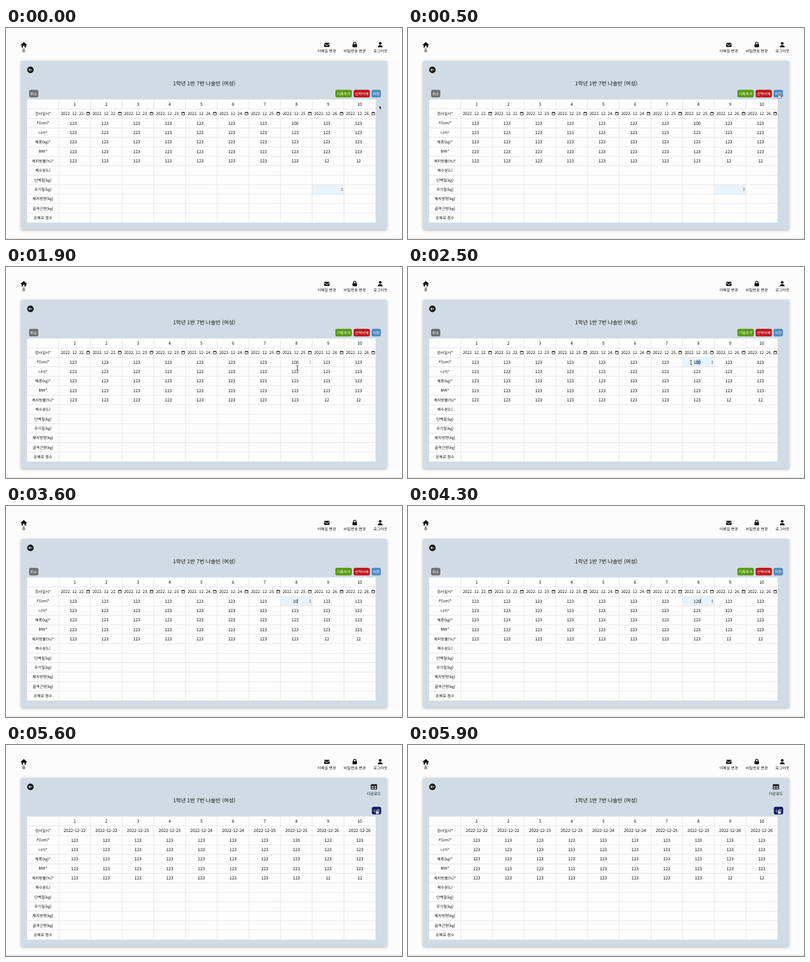
Animation of 600 by 320 pixels, one loop 6 s. Source, as an HTML page:

```html
<!DOCTYPE html>
<html lang="ko">
<head>
<meta charset="utf-8">
<title>측정 기록</title>
<style>
html, body { margin: 0; width: 100%; height: 100%; overflow: hidden; background: #fcfcfc; }
svg { display: block; width: 600px; height: 320px; }
text {
  font: 500 5.75px "Noto Sans CJK KR", "Noto Sans CJK", "Noto Sans KR", sans-serif;
  text-anchor: middle; text-rendering: geometricPrecision; fill: #111;
}
text.title { font-size: 8.05px; }
text.num { font-size: 6.5px; }
text.date { font-size: 6.25px; text-anchor: start; }
text.btn { fill: #fff; }
.panel { fill: #d0dbe5; filter: drop-shadow(0 1.5px 2px rgba(0, 0, 0, .3)); }
.grid { stroke: #e3e3e3; stroke-width: .8; fill: none; }
.focus { fill: #e8f3fe; }
.line { fill: none; stroke: #fff; stroke-width: .9; }
</style>
</head>
<body>
<svg viewBox="0 0 600 320" xmlns="http://www.w3.org/2000/svg">
  <rect width="600" height="320" fill="#fcfcfc"/>
  <rect y="318.6" width="600" height="1" fill="#dcdcdc"/>
  <rect class="panel" x="23" y="50" width="554" height="255.5" rx="1"/>

  <g fill="#111">
    <path d="M27 21.2L31.8 25.4L31 26.2L30.4 25.7V29.4H28V26.8H26V29.4H23.6V25.7L23 26.2L22.2 25.4Z"/>
    <rect x="482" y="22.4" width="8.2" height="6.3" rx=".9"/>
    <path class="line" d="M482 23.8L486.1 26.7L490.2 23.8" stroke-width=".7"/>
    <rect x="525" y="24.6" width="6.8" height="4.6" rx=".8"/>
    <path d="M526.4 25V23.6A2 2 0 0 1 530.4 23.6V25" fill="none" stroke="#111" stroke-width="1.1"/>
    <circle cx="567" cy="23.3" r="2.1"/>
    <path d="M563.4 29.3V28.6Q563.6 26 567 26T570.6 28.6V29.3Z"/>
    <circle cx="37" cy="63.5" r="4.9"/>
    <path class="line" d="M39.8 63.5H34.6M36.8 61.1L34.4 63.5L36.8 65.9"/>
  </g>
  <text x="27" y="35.6">홈</text>
  <text x="486" y="37.1">이메일 변경</text>
  <text x="528.5" y="37.1">비밀번호 변경</text>
  <text x="567.3" y="37.1">로그아웃</text>
  <text class="title" x="300.3" y="87.2">1학년 1반 7번 나솔빈 (여성)</text>

  <rect x="32" y="108.4" width="528" height="186.7" fill="#fdfdfd"/>
  <g id="focus"></g>
  <path id="grid" class="grid"/>
  <rect id="pick" y="140.4" height="7.6" fill="#a9c9ef"/>
  <g id="labels"></g>
  <g id="values"></g>
  <rect id="caret" y="140.6" width=".6" height="7" fill="#111"/>
  <path id="spin" d="M-1.2 -.9L0 -2.4L1.2 -.9ZM-1.2 .9L0 2.4L1.2 .9Z" fill="#444"/>

  <g id="edit"></g>
  <g id="read">
    <rect x="552.8" y="59.6" width="9.4" height="8" rx="1" fill="#111"/>
    <path d="M554 62.2H557V63.7H554ZM558 62.2H561V63.7H558ZM554 64.8H557V66.4H554ZM558 64.8H561V66.4H558Z" fill="#d0dbe5"/>
    <text x="557.5" y="76.1">다운로드</text>
  </g>

  <g id="cursor">
    <path id="arrow" d="M0 0V5.4L1.2 4.3L2.1 6.3L3 5.9L2.1 4H3.8Z" fill="#111" stroke="#fff" stroke-width=".4"/>
    <path id="hand" d="M-.8 .5Q0 -.4 .8 .5V2.4L3 3.2Q3.6 3.5 3.4 4.6L2.8 6.6H-.6L-2.4 4Q-2 3 -.8 3.8Z" fill="#fff" stroke="#111" stroke-width=".5"/>
    <path id="beam" d="M-1.4 -3.4Q0 -3.4 0 -2.6Q0 -3.4 1.4 -3.4M0 -2.6V2.6M-1.4 3.4Q0 3.4 0 2.6Q0 3.4 1.4 3.4" fill="none" stroke="#222" stroke-width=".7"/>
  </g>
</svg>
<script>
const LOOP = 6000, STEP = 100;
const LEFT = 32, TOP = 108.4, COL = 48, ROW = 14.36, COLS = 10;
const labels = ["검사일시*", "키(cm)*", "나이*", "체중(kg)*", "BMI*", "체지방률(%)*", "체수분(L)",
  "단백질(kg)", "무기질(kg)", "체지방량(kg)", "골격근량(kg)", "온체로 점수"];

const $ = id => document.getElementById(id);
const show = (node, on) => { node.style.display = on ? "" : "none"; };
const colX = c => LEFT + COL * c;
const midX = c => colX(c) + COL / 2;
const midY = r => TOP + ROW * (r + .5);

function add(parent, tag, attrs, content = "") {
  const node = document.createElementNS("http://www.w3.org/2000/svg", tag);
  for (const key in attrs) node.setAttribute(key, attrs[key]);
  node.textContent = content;
  return parent.appendChild(node);
}

function button(parent, x, width, fill, label) {
  add(parent, "rect", { x, y: 93.8, width, height: 11.4, rx: 2.8, fill });
  add(parent, "text", { class: "btn", x: x + width / 2, y: 101.6 }, label);
}

function focusCell(c, r) {
  return add($("focus"), "rect", { class: "focus", x: colX(c), y: TOP + ROW * r, width: COL, height: ROW });
}

// Table
let lines = "";
for (let r = 1; r <= labels.length; r++) lines += `M${LEFT} ${TOP + ROW * r}h${COL * (COLS + 1)}`;
for (let c = 1; c <= COLS; c++) lines += `M${colX(c)} ${TOP}v${ROW * 13}`;
$("grid").setAttribute("d", lines);

labels.forEach((label, i) => add($("labels"), "text", { x: midX(0), y: midY(i + 1) + 2.1 }, label));

let height;
for (let c = 1; c <= COLS; c++) {
  const x = midX(c), day = 22 + Math.floor((c - 1) / 2);
  add($("labels"), "text", { class: "num", x, y: midY(0) + 2.4 }, c);
  add($("read"), "text", { class: "num", x, y: midY(1) + 2.4 }, `2022-12-${day}`);
  add($("edit"), "text", { class: "date", x: colX(c) + 2.9, y: midY(1) + 2.1 }, `2022. 12. ${day}.`);
  add($("edit"), "path", {
    d: `M${colX(c) + 42.2} 128h4.4v3.9h-4.4zm0 .5h4.4m-3.4 -.5v-.9m2.4 .9v-.9`,
    fill: "none", stroke: "#111", "stroke-width": .7
  });
  for (let r = 2; r <= 6; r++) {
    const node = add($("values"), "text", { class: "num", x, y: midY(r) + 2.4 }, r === 6 && c > 8 ? 12 : 123);
    if (r === 2 && c === 8) height = node;
  }
}
button($("edit"), 35, 14, "#707070", "취소");
button($("edit"), 499, 25, "#589a12", "기록추가");
button($("edit"), 526.7, 24.6, "#bd141b", "선택삭제");
button($("edit"), 554, 14, "#4f88c0", "저장");
button($("read"), 554.4, 14, "#0c1560", "수정");

const mineralFocus = focusCell(9, 9), heightFocus = focusCell(8, 2);

// Pointer path: time, x, y
const path = [
  [0, 565.6, 117.6], [100, 565.6, 117.6], [500, 562, 100], [700, 561.5, 99],
  [1100, 562.4, 102], [1500, 562.4, 102], [1900, 441.4, 153], [2200, 444, 145],
  [2300, 444, 145], [2500, 428.8, 145], [2900, 431, 145], [4500, 431, 145],
  [5000, 565, 112], [5100, 579.6, 105], [5400, 562, 99], [5700, 561.8, 97.8], [6000, 561.8, 97.8]
];
const typed = [[0, "100"], [3500, "10"], [3800, "1"], [4000, "12"], [4200, "120"]];

function pointerAt(t) {
  const i = path.findIndex(p => p[0] > t);
  const [t0, x0, y0] = path[i - 1], [t1, x1, y1] = path[i];
  const u = (t - t0) / (t1 - t0), k = u * u * (3 - 2 * u);
  return [x0 + (x1 - x0) * k, y0 + (y1 - y0) * k];
}

function draw(now) {
  const t = Math.floor(now % LOOP / STEP) * STEP;
  const within = (a, b) => t >= a && t < b;
  const reading = within(600, 1400) || t >= 5500;
  const onMineral = t < 600, onHeight = within(2300, 5500), hovered = within(1900, 2300);

  show($("read"), reading);
  show($("edit"), !reading);
  $("values").setAttribute("transform", `translate(${reading ? 0 : -2} 0)`);
  show(mineralFocus, onMineral);
  show(heightFocus, onHeight);

  const value = typed.filter(k => k[0] <= t).pop()[1];
  height.textContent = value;

  show($("spin"), onMineral || onHeight || hovered);
  $("spin").setAttribute("transform", onMineral ? `translate(509 ${midY(9)})` : `translate(461 ${midY(2)})`);
  $("spin").setAttribute("opacity", hovered ? .6 : 1);

  const start = t < 2500 ? 439.8 : t < 2600 ? 436.2 : 432.6;
  show($("pick"), within(2400, 3000));
  $("pick").setAttribute("x", start);
  $("pick").setAttribute("width", 443.4 - start);

  show($("caret"), within(3000, 4800) && (t - 3000) % 1000 < 700);
  $("caret").setAttribute("x", 438 + value.length * 1.8);

  const [x, y] = pointerAt(t);
  const kind = x > 553 && x < 569 && y < 106 ? "hand" : x < 555 && y > 123 ? "beam" : "arrow";
  show($("cursor"), !within(3000, 4500));
  $("cursor").setAttribute("transform", `translate(${x} ${y})`);
  for (const id of ["arrow", "hand", "beam"]) show($(id), id === kind);
}

function tick() {
  draw(performance.now());
  requestAnimationFrame(tick);
}
tick();
</script>
</body>
</html>
```
